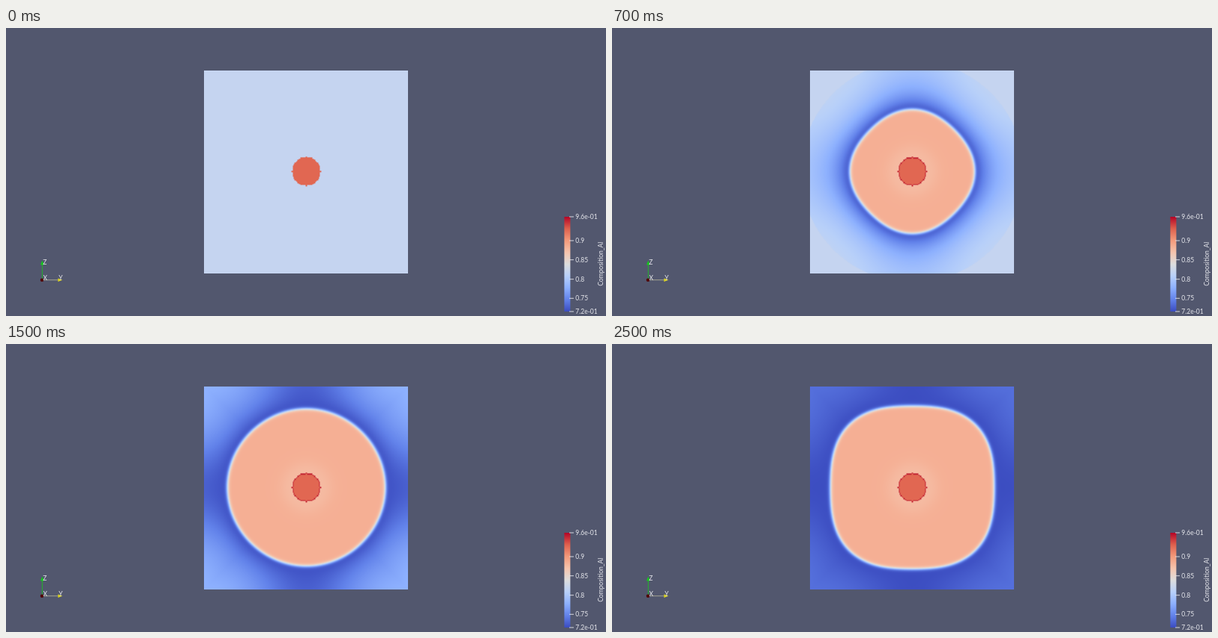
Animation of 800 by 386 pixels, one loop 2550 ms. Source, as an HTML page with a canvas:

```html
<!DOCTYPE html>
<html lang="en">
<head>
<meta charset="utf-8">
<title>Composition field</title>
<style>
html, body { margin: 0; width: 100%; height: 100%; overflow: hidden; background: #52576e; }
#stage { position: relative; width: 800px; height: 386px; overflow: hidden; }
canvas, svg { position: absolute; left: 0; top: 0; display: block; }
text { font-family: Lato, "Open Sans", sans-serif; font-size: 8.5px; fill: #e6e7ec; }
</style>
</head>
<body>
<div id="stage">
  <canvas id="view" width="800" height="386"></canvas>
  <svg width="800" height="386" viewBox="0 0 800 386">
    <defs><linearGradient id="ramp" x1="0" y1="1" x2="0" y2="0"></linearGradient></defs>
    <g id="axes">
      <path d="M50 337.7H69" stroke="#adac94" stroke-width="0.9"/>
      <path d="M48.3 336V317" stroke="#22b52a" stroke-width="1"/>
      <path d="M46 317.5L48.3 311.5L50.6 317.5Z" fill="#16c81c"/>
      <path d="M69.3 335.6L75.3 337.8L69.3 340Z" fill="#ddd522"/>
      <circle cx="48" cy="337.8" r="2.3" fill="#500508"/>
      <text x="49.3" y="316.8">Z</text>
      <text x="49.5" y="337.8">X</text>
      <text x="70.3" y="337.8">Y</text>
    </g>
    <g id="legend">
      <rect x="744.4" y="253" width="8" height="127" fill="url(#ramp)"/>
      <text transform="translate(795.6 345.8) rotate(-90)">Composition_Al</text>
    </g>
  </svg>
</div>
<script>
const LOOP = 2550, STEP = 50, SIZE = 273, HALF = SIZE / 2;
const LEFT = 263.6, TOP = 56.5, CX = 400.6 - LEFT, CY = 192.4 - TOP;
const BASE = 0.417, CELL = 1.365, SEED = 14;

// Diverging blue-grey-red ramp
const ramp = [
  [59, 76, 192], [98, 130, 234], [141, 176, 254], [184, 208, 249], [221, 221, 221],
  [245, 196, 173], [244, 154, 123], [222, 96, 77], [180, 4, 38]
];

function color(v) {
  const p = Math.min(0.9999, Math.max(0, v)) * 8, i = Math.floor(p);
  return ramp[i].map((c, n) => Math.round(c + (ramp[i + 1][n] - c) * (p - i)));
}
const lut = Array.from({ length: 1024 }, (_, i) => color(i / 1023));

// Values at key times; growth is close to linear in sqrt(t)
const times = [0, 50, 200, 400, 700, 1100, 1300, 1750, 2500];
const keys = {
  axis:   [20, 32, 53, 68, 83.5, 99, 103.7, 108, 109.6],
  diag:   [20, 32, 52.8, 66.5, 79.5, 94.5, 101, 110, 119.5],
  edge:   [BASE, BASE, BASE, 0.4, 0.32, 0.17, 0.08, 0.015, 0.005],
  corner: [BASE, BASE, BASE, BASE, BASE, 0.375, 0.31, 0.2, 0.085],
  rim:    [0.15, 0.12, 0.06, 0.045, 0.03, 0.02, 0.015, 0.008, 0.002],
  reach:  [5, 6, 12, 18, 25, 31, 36, 44, 48]
};

function stateAt(t) {
  let i = 0;
  while (i < times.length - 2 && t > times[i + 1]) i++;
  const from = Math.sqrt(times[i]), to = Math.sqrt(times[i + 1]);
  const k = (Math.sqrt(t) - from) / (to - from);
  const state = { t, halo: t <= 800 ? Math.sqrt(400 + 31 * t) : Infinity };
  for (const name in keys) {
    const list = keys[name];
    state[name] = list[i] + (list[i + 1] - list[i]) * k;
  }
  return state;
}

const inSeed = (i, j) => i * i + j * j <= SEED * SEED;

function seedValue(i, j, t) {
  const inner = inSeed(Math.abs(i) + 1, j) && inSeed(i, Math.abs(j) + 1);
  return inner || t === 0 ? 0.86 : 0.955;
}

function fieldValue(x, y, st) {
  const i = Math.round(x / CELL), j = Math.round(y / CELL);
  if (inSeed(i, j)) return seedValue(i, j, st.t);
  if (st.t === 0) return BASE;

  const r = Math.hypot(x, y);
  const q = 4 * x * x * y * y / (r * r * r * r);
  const front = st.axis + (st.diag - st.axis) * q;
  const s = r - front;
  const inside = 0.687 - 0.033 * Math.exp(-(((r - 20) / 16) ** 2));
  if (s < -12) return inside;

  let outside = BASE;
  if (r <= st.halo) {
    const span = r * HALF / Math.max(Math.abs(x), Math.abs(y)) - front;
    const wall = st.edge + (st.corner - st.edge) * q;
    const end = Math.exp(-span / st.reach);
    const fall = (Math.exp(-Math.max(0, s - 3) / st.reach) - end) / (1 - end);
    outside = wall + (st.rim - wall) * fall;
  }
  return inside + (outside - inside) * (0.5 + 0.5 * Math.tanh(s / 2.5));
}

const view = document.getElementById("view").getContext("2d");
const buffer = document.createElement("canvas");
buffer.width = buffer.height = SIZE;
const plane = buffer.getContext("2d");
const image = plane.createImageData(SIZE, SIZE);

function draw(t) {
  const st = stateAt(t), data = image.data;
  let p = 0;
  for (let y = 0; y < SIZE; y++) {
    for (let x = 0; x < SIZE; x++) {
      const v = fieldValue(x + 0.5 - CX, y + 0.5 - CY, st);
      const c = lut[Math.max(0, Math.min(1023, Math.round(v * 1023)))];
      data[p++] = c[0];
      data[p++] = c[1];
      data[p++] = c[2];
      data[p++] = 255;
    }
  }
  plane.putImageData(image, 0, 0);
  view.fillStyle = "#52576e";
  view.fillRect(0, 0, 800, 386);
  view.drawImage(buffer, LEFT, TOP, SIZE - 0.3, SIZE - 0.3);
}

function add(parent, tag, attrs, text) {
  const el = document.createElementNS(parent.namespaceURI, tag);
  for (const name in attrs) el.setAttribute(name, attrs[name]);
  if (text) el.textContent = text;
  parent.appendChild(el);
}

function buildLegend() {
  const grad = document.getElementById("ramp"), legend = document.getElementById("legend");
  ramp.forEach((c, i) => add(grad, "stop", { offset: i / 8, "stop-color": `rgb(${c})` }));
  const marks = [["9.6e-01", 253], ["0.9", 285], ["0.85", 310.7], ["0.8", 336.7], ["0.75", 362.3], ["7.2e-01", 380]];
  for (const [label, y] of marks) {
    add(legend, "path", { d: `M751 ${y}H757`, stroke: "#e6e7ec", "stroke-width": 0.9 });
    add(legend, "text", { x: 759.3, y: y + 2.9 }, label);
  }
}

let shown = -1;
const start = performance.now();
function tick() {
  const t = Math.floor(((performance.now() - start) % LOOP) / STEP) * STEP;
  if (t !== shown) draw(shown = t);
  requestAnimationFrame(tick);
}
buildLegend();
tick();
</script>
</body>
</html>
```
